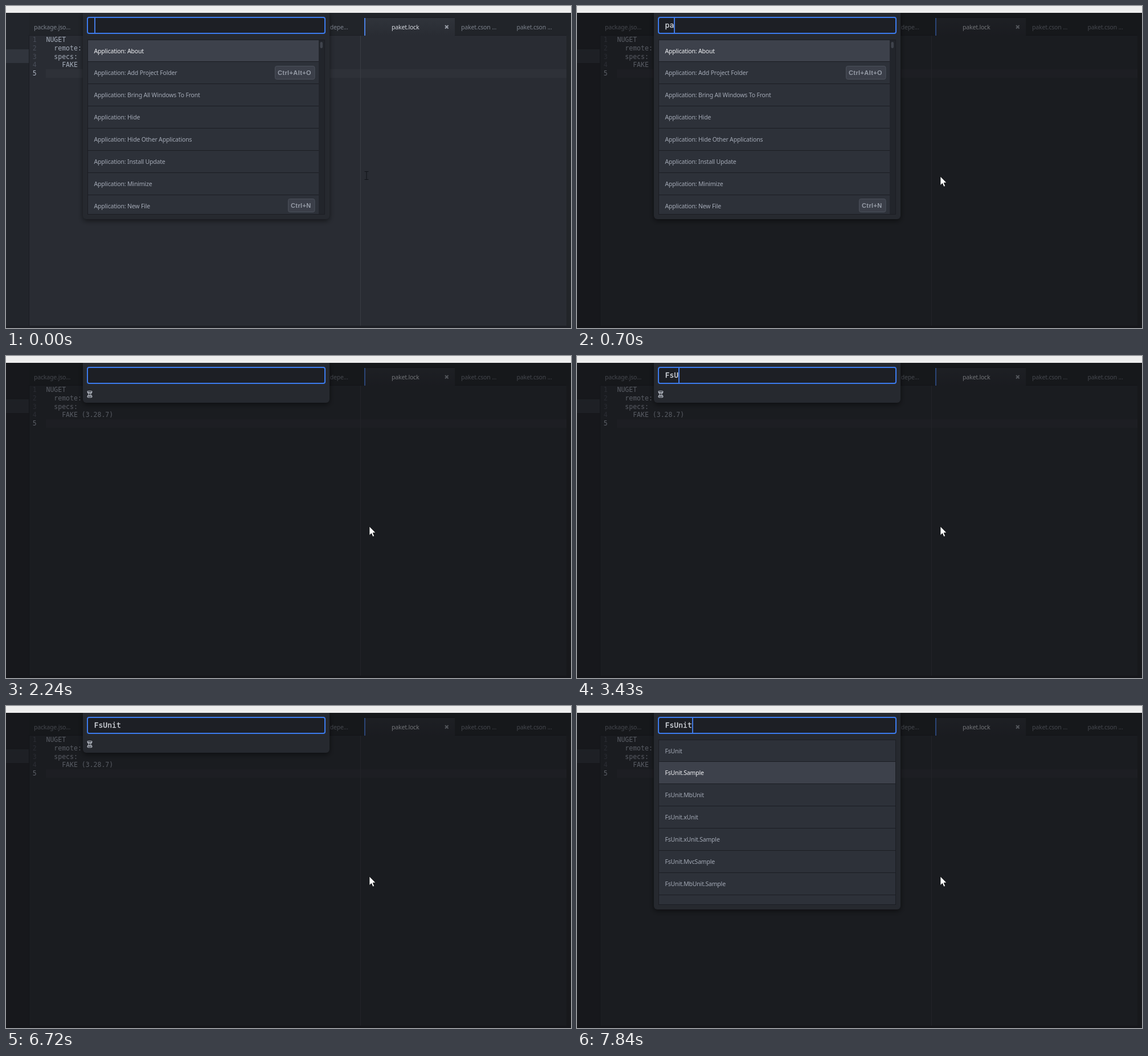
Write an HTML page with a canvas that moves like this. It is 992 px wide and 565 px high and loops after 8000 ms.

```html
<!DOCTYPE html>
<html lang="en">
<head>
<meta charset="utf-8">
<title>Command palette</title>
<style>
html, body { margin: 0; width: 100%; height: 100%; overflow: hidden; background: #1b1c20; }
canvas { display: block; width: 992px; height: 565px; }
</style>
</head>
<body>
<canvas id="stage" width="992" height="565"></canvas>
<script>
const LOOP = 8000;
const ctx = document.getElementById('stage').getContext('2d');
const UI = '"Noto Sans", "Open Sans", sans-serif';
const MONO = '"DejaVu Sans Mono", monospace';
const KEYS = '"Liberation Sans", sans-serif';
const EDGE = '#1b1d23';

const commands = ['About', 'Add Project Folder', 'Bring All Windows To Front', 'Hide',
  'Hide Other Applications', 'Install Update', 'Minimize', 'New File'].map(s => 'Application: ' + s);
const shortcuts = { 1: ['Ctrl+Alt+O', 472], 7: ['Ctrl+N', 495] };
const paket = ['Add', 'Init', 'Update', 'Install', 'Restore', 'Outdated', 'Update Paket']
  .map(s => 'Paket: ' + s).concat('Package Generator: Generate Package');
const packages = ['', '.Sample', '.MbUnit', '.xUnit', '.xUnit.Sample', '.MvcSample', '.MbUnit.Sample']
  .map(s => 'FsUnit' + s);

// [start ms, value]: the last entry already reached is current
const typed = [[0, ''], [560, 'p'], [630, 'pa'], [840, 'pak'], [910, 'pake'], [2100, ''],
  [3010, 'F'], [3150, 'Fs'], [3430, 'FsU'], [3710, 'FsUn'], [3990, 'FsUnt'],
  [4480, 'FsUn'], [4690, 'FsUni'], [4830, 'FsUnit']];
const caret = [[0, 1], [420, 0], [560, 1], [1400, 0], [1750, 1], [2100, 0], [2450, 1], [2870, 0],
  [3010, 1], [5320, 0], [5670, 1], [6020, 0], [6370, 1], [6720, 0], [7140, 1], [7490, 0], [7840, 1]];
const views = [[0, 'commands'], [770, 'paket'], [2100, 'empty'], [2170, 'loading'], [6930, 'packages']];
const shades = [[0, null], [70, 'rgba(13,18,20,.5)'], [140, 'rgba(13,13,15,.5)']];
const picks = [[0, 0], [7770, 1]];

function at(track, t) {
  let value;
  for (const [start, v] of track) if (t >= start) value = v;
  return value;
}

function rect(x, y, w, h, color) {
  ctx.fillStyle = color;
  ctx.fillRect(x, y, w, h);
}

function round(x, y, w, h, r, fill, line, width = 1) {
  ctx.beginPath();
  ctx.roundRect(x, y, w, h, r);
  ctx.fillStyle = fill;
  ctx.fill();
  if (!line) return;
  ctx.strokeStyle = line;
  ctx.lineWidth = width;
  ctx.stroke();
}

function text(s, x, y, font, color, spacing = 0) {
  ctx.font = font;
  ctx.letterSpacing = spacing + 'px';
  ctx.fillStyle = color;
  ctx.fillText(s, x, y);
}

const label = (s, x, y, color) => text(s, x, y, '10.5px ' + UI, color, -0.18);
const code = (s, x, y, color) => text(s, x, y, '11.5px ' + MONO, color);

function drawEditor() {
  rect(0, 12, 992, 553, '#292c33');
  rect(0, 12, 992, 40, '#212429');
  rect(0, 12, 40, 553, '#22252b');
  rect(0, 76, 40, 24, '#31353d');
  rect(40, 51, 944, 1, EDGE);
  rect(40, 52, 1, 509, EDGE);
  rect(984, 52, 8, 509, '#222529');
  rect(0, 561, 992, 4, '#1e2026');

  const glow = ctx.createLinearGradient(0, 20, 0, 52);
  glow.addColorStop(0, '#30343b');
  glow.addColorStop(1, '#292c33');
  rect(629, 20, 159, 32, glow);
  rect(629, 20, 159, 1, EDGE);
  rect(629, 21, 2, 31, '#4a7fe0');
  const idle = '#7b818b';
  label('package.jso...', 49, 40.5, idle);
  label('.depe...', 566, 40.5, idle);
  label('paket.cson ...', 799, 40.5, idle);
  label('paket.cson ...', 896.5, 40.5, idle);
  label('paket.lock', 677, 40.5, '#d7dae0');
  ctx.strokeStyle = '#9a9fa8';
  ctx.lineWidth = 2;
  ctx.beginPath();
  ctx.moveTo(771, 34); ctx.lineTo(776.5, 39.5);
  ctx.moveTo(776.5, 34); ctx.lineTo(771, 39.5);
  ctx.stroke();

  rect(70, 111, 914, 15, '#2e3138');
  rect(622, 52, 1, 509, '#383b42');
  ['NUGET', '  remote:', '  specs:', '    FAKE (3.28.7)', ''].forEach((line, i) => {
    const y = 63 + i * 14.75;
    code(i + 1, 46.8, y, i === 4 ? '#abb2bf' : '#484d58');
    code(line, 70.5, y, '#a5adba');
  });
}

function drawIBeam() {
  ctx.strokeStyle = '#111318';
  ctx.lineWidth = 1;
  ctx.beginPath();
  for (const y of [290.5, 304.5]) {
    ctx.moveTo(629.5, y);
    ctx.lineTo(636.5, y);
  }
  ctx.moveTo(633, 290.5);
  ctx.lineTo(633, 304.5);
  ctx.stroke();
}

function drawArrow() {
  const points = [[0, 0], [0, 15.5], [3.6, 12.3], [6, 18], [8.6, 16.9], [6.2, 11.3], [10.8, 11]];
  ctx.beginPath();
  for (const [x, y] of points) ctx.lineTo(638 + x, 299 + y);
  ctx.closePath();
  ctx.fillStyle = '#fff';
  ctx.fill();
  ctx.strokeStyle = '#0b0c0e';
  ctx.lineWidth = 0.7;
  ctx.stroke();
}

function drawHourglass() {
  ctx.strokeStyle = '#b9bec8';
  ctx.lineWidth = 1.1;
  ctx.beginPath();
  ctx.ellipse(147, 62.5, 4, 1.3, 0, 0, 7);
  ctx.moveTo(151, 71.5);
  ctx.ellipse(147, 71.5, 4, 1.3, 0, 0, 7);
  for (const side of [-1, 1]) {
    ctx.moveTo(147 + side * 4, 62.5);
    ctx.bezierCurveTo(147 + side * 4, 66, 147 + side, 66, 147 + side, 67);
    ctx.bezierCurveTo(147 + side, 68, 147 + side * 4, 68, 147 + side * 4, 71.5);
  }
  ctx.moveTo(144.5, 65); ctx.lineTo(149.5, 65);
  ctx.moveTo(145, 69.5); ctx.lineTo(149, 69.5);
  ctx.stroke();
}

function drawList(items, pick, bottom, thumb) {
  const right = thumb ? 549 : 559;
  rect(143, 59, 417, bottom - 59, EDGE);
  rect(144, 60, 415, bottom - 61, '#22252b');
  ctx.save();
  ctx.beginPath();
  ctx.rect(144, 60, 415, bottom - 61);
  ctx.clip();
  for (let i = 0; i < 8; i++) {
    const top = Math.round(59.3 + i * 38.9);
    const next = Math.round(59.3 + (i + 1) * 38.9);
    const on = i === pick;
    rect(144, top, right - 144, next - top, on ? '#3d414b' : '#2d3139');
    rect(144, next - 1, right - 144, 1, EDGE);
    if (items[i]) label(items[i], 154.5, 82.5 + i * 38.9, on ? '#f0f1f4' : '#a3a9b5');
    if (items === commands && shortcuts[i]) {
      const [keys, x] = shortcuts[i];
      const y = Math.round(105 + i * 38.9 - 38.9) + 0.5;
      round(x + 0.5, y, 541.5 - x, 23, 3, '#3b3f49', '#4b505a');
      text(keys, x + 5, y + 15.7, 'bold 11px ' + KEYS, '#969ca7', 0.4);
    }
  }
  ctx.restore();
  if (thumb) round(551.5, 63, 4.5, thumb, 2.2, '#3f434c');
}

function drawPanel(t) {
  const view = at(views, t);
  const bottom = { commands: 374, paket: 374, packages: 357 }[view] || 82;
  ctx.save();
  ctx.shadowColor = 'rgba(0,0,0,.5)';
  ctx.shadowBlur = 10;
  ctx.shadowOffsetY = 3;
  round(135, 12, 433, bottom - 12, [0, 0, 6, 6], '#26292f');
  ctx.restore();

  round(143, 20, 417, 28, 3, '#1d1f25', '#3c7bee', 2);
  const query = at(typed, t);
  text(query, 154.5, 38.3, '13.1px ' + MONO, '#d7dae0');
  ctx.strokeStyle = '#d7dae0';
  ctx.lineWidth = 0.3;
  ctx.strokeText(query, 154.5, 38.3);
  if (at(caret, t)) rect(Math.round(154.6 + query.length * 7.9), 21, 2, 26, '#4479de');

  if (view === 'commands') drawList(commands, 0, 366, 11);
  if (view === 'paket') drawList(paket, 0, 366, 120);
  if (view === 'packages') drawList(packages, at(picks, t), 349, 0);
  if (view === 'loading') drawHourglass();
}

function draw(t) {
  drawEditor();
  const shade = at(shades, t);
  if (shade) rect(0, 12, 992, 553, shade);
  else drawIBeam();
  drawPanel(t);
  if (shade) drawArrow();
  rect(0, 0, 992, 12, '#eeeeee');
}

const begin = performance.now();
function tick() {
  draw((performance.now() - begin) % LOOP);
  requestAnimationFrame(tick);
}
tick();
</script>
</body>
</html>
```
